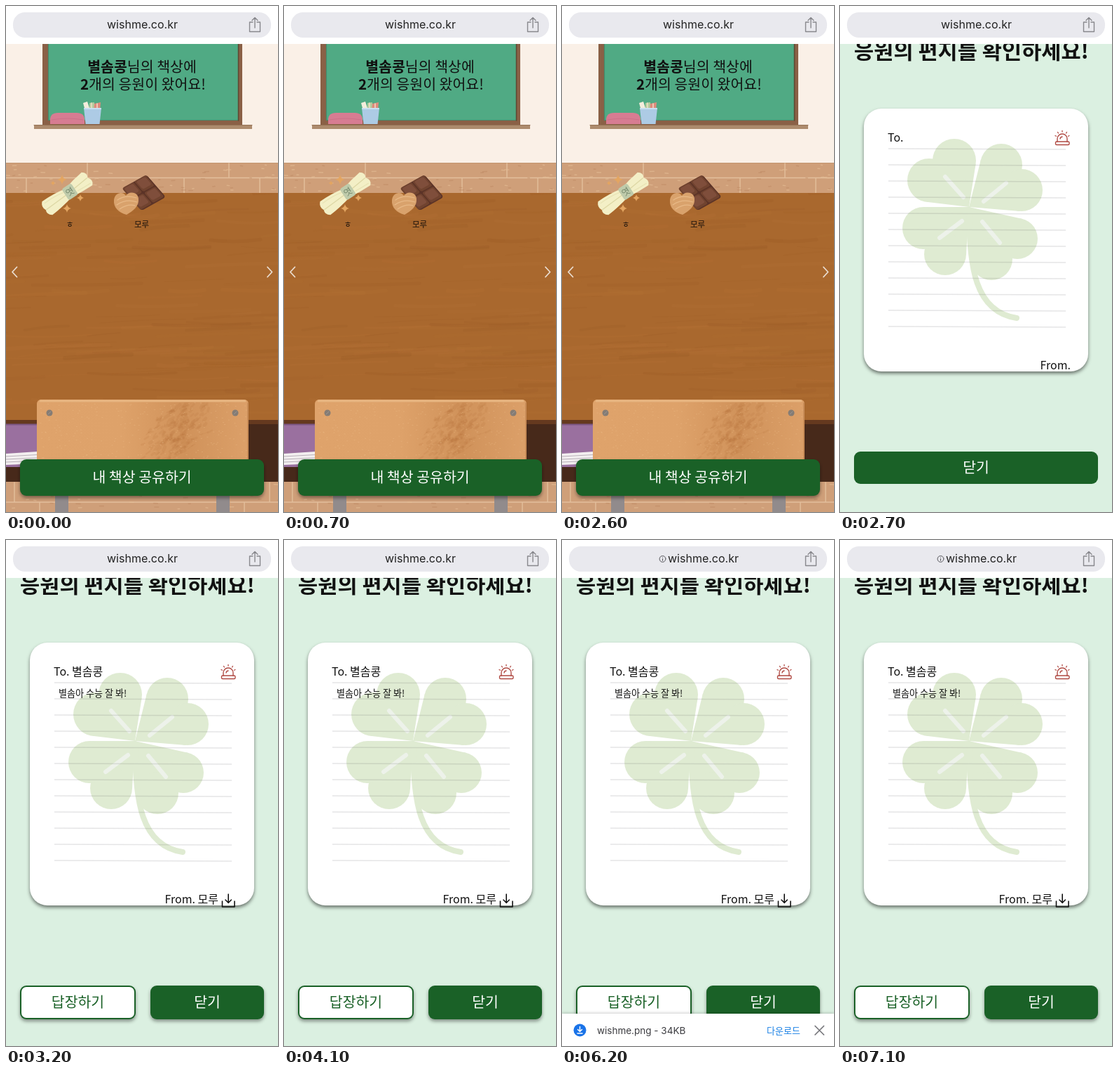
These frames come from a looping animation (388x720 px, 7200 ms). An HTML page with a canvas:

```html
<!DOCTYPE html>
<html lang="ko">
<head>
<meta charset="utf-8">
<title>응원 책상</title>
<style>
html, body { margin: 0; width: 100%; height: 100%; overflow: hidden; background: #fff; }
canvas { display: block; width: 388px; height: 720px; }
</style>
</head>
<body>
<canvas id="stage" width="388" height="720"></canvas>
<script>
const W = 388, H = 720, LOOP = 7200;
const KR = '"Noto Sans CJK KR", "Noto Sans CJK", sans-serif';
const UI = 'Inter, "Noto Sans CJK KR", sans-serif';
const GREEN = '#1a6127';
const OWNER = '별솜콩', SENDER = '모루';
const view = document.getElementById('stage').getContext('2d');
let g = view;

function rect(x, y, w, h, color) {
  g.fillStyle = color;
  g.fillRect(x, y, w, h);
}
function round(x, y, w, h, r, color) {
  g.beginPath();
  g.roundRect(x, y, w, h, r);
  g.fillStyle = color;
  g.fill();
}
function disc(x, y, r, color) {
  g.beginPath();
  g.arc(x, y, r, 0, 7);
  g.fillStyle = color;
  g.fill();
}
function fill(d, color) {
  g.fillStyle = color;
  g.fill(new Path2D(d));
}
function line(d, color, width = 1, cap = 'round') {
  g.strokeStyle = color;
  g.lineWidth = width;
  g.lineCap = cap;
  g.lineJoin = 'round';
  g.stroke(new Path2D(d));
}
// y is the optical middle of the line
function text(s, x, y, size, { color = '#111', weight = 400, align = 'left', font = KR } = {}) {
  g.font = `${weight} ${size}px ${font}`;
  g.textAlign = align;
  g.fillStyle = color;
  g.fillText(s, x, y + size * 0.36);
  return g.measureText(s).width;
}
function shadow(color, blur, dy) {
  g.shadowColor = color;
  g.shadowBlur = blur;
  g.shadowOffsetY = dy;
}
function isolated(draw) {
  g.save();
  draw();
  g.restore();
}
function clipped(x, y, w, h, draw) {
  isolated(() => {
    g.beginPath();
    g.rect(x, y, w, h);
    g.clip();
    draw();
  });
}
function random(seed) {
  return () => (seed = seed * 16807 % 2147483647) / 2147483647;
}
function button(label, x, y, w, h, { outline = false, raised = true } = {}) {
  isolated(() => {
    if (raised) shadow('rgba(0,0,0,.4)', 5, 3);
    round(x, y, w, h, 9, GREEN);
  });
  if (outline) round(x + 2, y + 2, w - 4, h - 4, 7, '#fff');
  text(label, x + w / 2, y + h / 2, 20.5, { color: outline ? GREEN : '#fff', weight: 500, align: 'center' });
}

function bricks() {
  const mortar = '#e3bf9c';
  rect(0, 223, W, 43, '#cf9f79');
  rect(0, 677, W, 43, '#cf9f79');
  line('M0 223.5H388', '#c4966f', 1);
  line('M0 244.5H388M116 224V244M318 224V244M29 245V266M254 245V266M362 245V266', mortar, 1.4);
  line('M0 706H388M12 678V706M376 678V706M48 706V720M340 706V720', mortar, 1.4);
  const rnd = random(41);
  for (let i = 0; i < 90; i++) {
    const x = rnd() * W, y = i < 60 ? 226 + rnd() * 38 : 680 + rnd() * 38;
    const tone = rnd() < 0.5 ? 'rgba(186,134,96,.45)' : 'rgba(228,190,150,.6)';
    line(`M${x} ${y}l${2 + rnd() * 4} ${rnd() - 0.5}`, tone, 1.5);
  }
}

function board() {
  rect(52, 54, 285, 115, '#8a6046');
  rect(60, 54, 271, 109, '#50aa84');
  line('M60.5 54V162.5H331', '#458a6c', 1.2);
  line('M331.5 54V163', '#5d4731', 1.5);
  rect(40, 169, 311, 6, '#ad8b6d');
  line('M40 169.5H351', '#957255');
  fill('M63 168V162Q63 152 74 152H101Q112 152 112 162V168Z', '#d77c92');
  line('M65 162Q88 158 110 162', '#cd7189', 1);
  fill('M110 138L116 136L120 148L113 149Z', '#f3eddc');
  fill('M119 138L126 137V149H119Z', '#b3cc9d');
  fill('M126 139L135 137L134 149H125Z', '#dd8b7c');
  line('M122 138V147M130 139V147', '#f1dfc6', 1.5);
  fill('M111 145H136L133.5 168H113.5Z', '#adcbe5');
  line('M112 146H135', '#c9e0f2', 2);
  const size = 20.5;
  g.font = `900 ${size}px ${KR}`;
  const nameWidth = g.measureText(OWNER).width;
  g.font = `500 ${size}px ${KR}`;
  const left = 194 - (nameWidth + g.measureText('님의 책상에').width) / 2;
  text(OWNER, left, 87, size, { weight: 900 });
  text('님의 책상에', left + nameWidth, 87, size, { weight: 500 });
  const two = text('2', 106, 112, size, { weight: 900 });
  text('개의 응원이 왔어요!', 106 + two, 112, size, { weight: 500 });
}

function desk() {
  rect(0, 266, W, 325, '#a9682e');
  clipped(0, 266, W, 324, () => {
    const rnd = random(7);
    for (let i = 0; i < 130; i++) {
      const x = rnd() * 460 - 70, y = 266 + rnd() * 324, w = 40 + rnd() * 130, bend = rnd() * 14 - 7;
      const tone = rnd() < 0.55 ? '135,74,28' : '190,122,62';
      line(`M${x} ${y}q${w / 2} ${bend} ${w} ${bend / 2 - 3}`, `rgba(${tone},${0.04 + rnd() * 0.09})`, 1 + rnd() * 5);
    }
  });
  rect(0, 589, W, 6, '#65391f');
  rect(0, 595, W, 82, '#47291a');
  rect(0, 595, 45, 61, '#9a709f');
  line('M0 595.5H45', '#7c5783', 2);
  fill('M0 637L45 634V651L0 653Z', '#f3eff0');
  line('M0 641L45 638.5M0 645L45 643M0 649L45 647', '#b9b0b9', 1);
}

function chair() {
  rect(70, 690, 19, 30, '#918b8c');
  rect(300, 690, 19, 30, '#918b8c');
  const wood = g.createLinearGradient(44, 0, 346, 0);
  wood.addColorStop(0, '#dfa36b');
  wood.addColorStop(0.4, '#dea26a');
  wood.addColorStop(0.7, '#d0925a');
  wood.addColorStop(1, '#dca069');
  round(44, 560, 302, 110, [6, 6, 0, 0], wood);
  line('M49 562H341', '#e8b681', 3);
  line('M345 565V650', '#c08550', 1.5);
  clipped(46, 564, 298, 84, () => {
    const rnd = random(93);
    for (let i = 0; i < 190; i++) {
      const x = 185 + (rnd() + rnd()) * 55, y = 640 - (x - 185) * 0.6 + (rnd() - 0.5) * 70;
      line(`M${x} ${y}l${1 + rnd() * 6} ${-1 - rnd() * 4}`, 'rgba(176,110,54,.13)', 1 + rnd() * 4);
    }
    for (let i = 0; i < 260; i++) {
      rect(46 + rnd() * 296, 564 + rnd() * 84, 2, 1, 'rgba(244,200,150,.28)');
    }
  });
  for (const x of [62, 327]) {
    disc(x, 579, 4.5, '#857c74');
    line(`M${x - 2} 581L${x + 2} 577`, '#999593', 1);
  }
}

function sparkle(x, y, r) {
  fill(`M${x} ${y - r}Q${x + 1} ${y - 1} ${x + r} ${y}Q${x + 1} ${y + 1} ${x} ${y + r}` +
    `Q${x - 1} ${y + 1} ${x - r} ${y}Q${x - 1} ${y - 1} ${x} ${y - r}`, '#e3a561');
}

function scroll() {
  sparkle(80, 247, 7);
  sparkle(101, 251, 5);
  sparkle(67, 252, 3);
  sparkle(87, 288, 6);
  sparkle(106, 273, 5);
  isolated(() => {
    g.translate(87, 267);
    g.rotate(-0.58);
    fill('M-36 -10Q-18 -11 2 -7Q18 -12 34 -14Q41 -9 37 -3Q43 4 37 10Q20 10 3 8Q-18 13 -34 14Q-41 9 -38 3Q-42 -4 -36 -10Z', '#f3efc6');
    line('M-37 3Q-18 2 0 1Q18 -1 36 -3', '#ddd7a4', 1.2);
    line('M-34 -6Q-18 -7 -3 -4M15 5Q26 6 36 6', '#e7e2b3', 1);
    round(-3, -9.5, 16, 19, 3, '#bfcbab');
    text('엿', 5, 0, 12.5, { color: '#76896d', align: 'center' });
  });
  text('ㅎ', 91, 311, 11.5, { color: '#1c120c', weight: 500, align: 'center' });
}

function chocolate() {
  isolated(() => {
    g.translate(196, 265.5);
    g.transform(34 / 40, -19 / 40, 27 / 40, 31 / 40, 0, 0);
    round(-20, -20, 41, 41, 4, '#5b3327');
    for (const x of [-20, 0.5]) for (const y of [-20, 0.5]) {
      round(x, y, 19, 19, 3, '#70432f');
      round(x + 2, y + 1.5, 15, 14, 3, '#7f4e3b');
    }
  });
  fill('M171 270C175 263 188 264 189 274C190 285 182 291 172 297C161 294 153 287 154 276C155 265 167 263 171 270Z', '#d9a26c');
  line('M159 276Q170 268 186 273M158 283Q171 274 187 279M162 289Q174 281 184 284', '#e8b987', 1.3);
  text(SENDER, 193.5, 311, 11.5, { color: '#1c120c', weight: 500, align: 'center' });
}

function deskPage() {
  rect(0, 54, W, 169, '#faf0e7');
  bricks();
  board();
  desk();
  chair();
  scroll();
  chocolate();
  line('M15.5 371.5L9 378.5L15.5 385.5M373 371.5L379.5 378.5L373 385.5', '#eaddd0', 1.8);
  button('내 책상 공유하기', 20, 645, 348, 52);
}

function leaf(lobes) {
  const cx = 184, cy = 286, color = '#dfebd2';
  const side = ([x, y, r], turn) => {
    const d = Math.hypot(x - cx, y - cy), a = Math.atan2(y - cy, x - cx) + turn * Math.asin(r / d);
    const reach = Math.sqrt(d * d - r * r);
    return [cx + Math.cos(a) * reach, cy + Math.sin(a) * reach];
  };
  const [a, b] = lobes;
  const points = [[cx, cy], side(a, -1), a, b, side(b, 1)];
  fill('M' + points.map(p => p[0] + ' ' + p[1]).join('L') + 'Z', color);
  for (const lobe of lobes) disc(...lobe, color);
}

function clover() {
  leaf([[127, 248, 31], [163, 220, 31]]);
  leaf([[230, 226, 30], [259, 262, 30]]);
  leaf([[253, 331, 29], [216, 360, 30]]);
  leaf([[150, 353, 30], [119, 316, 30]]);
  line('M184 290C184 370 192 435 252 444', '#dfebd2', 8);
  line('M150 243L176 272M205 278L237 252M142 330L174 306M203 307L228 337', '#edf2ea', 6);
}

function siren() {
  const red = '#b04a43';
  line('M310 193V189A7 7 0 0 1 324 189V193M314 189A3.5 3.5 0 0 1 317 186', red, 1.4);
  g.beginPath();
  g.roundRect(307.5, 193, 19.5, 4.5, 1.5);
  g.stroke();
  line('M317 177.5V179M310.5 179.5L311.5 181M323.5 179.5L322.5 181M307 184.5L308.5 185.3M327 184.5L325.5 185.3', red, 1.3);
}

function letterPage(loaded) {
  rect(0, 54, W, H - 54, '#dbf0e1');
  text('응원의 편지를 확인하세요!', 187.5, 63.5, 30.6, { weight: 700, align: 'center' });
  isolated(() => {
    shadow('rgba(0,0,0,.5)', 5, 3);
    round(34, 146, 320, 374, 25, '#fff');
  });
  clover();
  for (let i = 0; i < 12; i++) {
    const y = 203 + i * 23;
    line(`M69 ${y}L322 ${y + 1}`, 'rgba(70,70,80,.14)', 1.5, 'butt');
  }
  siren();
  text(loaded ? 'To. ' + OWNER : 'To.', 68, 187, 16);
  if (!loaded) {
    text('From.', 329, 511, 16, { align: 'right' });
    button('닫기', 20, 634, 348, 46, { raised: false });
    return;
  }
  text('별솜아 수능 잘 봐!', 75, 218, 13.1);
  text('From. ' + SENDER, 303, 511, 16, { align: 'right' });
  line('M308.5 514V522H326V514M317.2 504V516M313 512L317.2 516.3L321.4 512', '#111', 1.6);
  button('답장하기', 20, 634, 165, 48, { outline: true });
  button('닫기', 206, 634, 162, 48);
}

function addressBar(info) {
  rect(0, 0, W, 54, '#fff');
  round(10, 9, 368, 36, 17, '#e9e9ee');
  text('wishme.co.kr', info ? 201.5 : 194.5, 26.5, 16, { color: '#222', align: 'center', font: UI });
  if (info) {
    g.beginPath();
    g.arc(143.5, 27, 4.4, 0, 7);
    g.strokeStyle = '#55555a';
    g.lineWidth = 1;
    g.stroke();
    line('M143.5 26.8V29.2M143.5 24.7V24.8', '#55555a', 1.1);
  }
  line('M352 23H347.5V36.5H362.5V23H358M355 31V17M351 20.5L355 16.5L359 20.5', '#88888d', 1.4);
}

function downloadBar(amount) {
  if (amount <= 0) return;
  isolated(() => {
    g.translate(0, 46 * (1 - amount));
    isolated(() => {
      shadow('rgba(0,0,0,.2)', 4, -1);
      rect(0, 674, W, 46, '#fff');
    });
    disc(25.5, 697.5, 9, '#1a73e8');
    line('M25.5 692.5V699M22.5 696.5L25.5 699.5L28.5 696.5M22 702H29', '#fff', 1.5);
    text('wishme.png - 34KB', 50, 698, 13.5, { color: '#3c3c40', font: UI });
    text('다운로드', 316, 698, 13, { color: '#1a80e5', align: 'center' });
    line('M361 691.5L373.5 704M373.5 691.5L361 704', '#77777c', 1.7);
  });
}

// Static pages are painted once
function page(draw) {
  const canvas = document.createElement('canvas');
  canvas.width = W;
  canvas.height = H;
  g = canvas.getContext('2d');
  draw();
  g = view;
  return canvas;
}
const deskView = page(deskPage);
const emptyLetter = page(() => letterPage(false));
const fullLetter = page(() => letterPage(true));

const ease = p => {
  p = Math.min(1, Math.max(0, p));
  return p * p * (3 - 2 * p);
};

function render(t) {
  g.drawImage(t < 2700 ? deskView : t < 2800 ? emptyLetter : fullLetter, 0, 0);
  addressBar(t >= 5400);
  downloadBar(ease((t - 5350) / 300) - ease((t - 6750) / 300));
}

const start = performance.now();
function tick() {
  render((performance.now() - start) % LOOP);
  requestAnimationFrame(tick);
}
tick();
</script>
</body>
</html>
```
